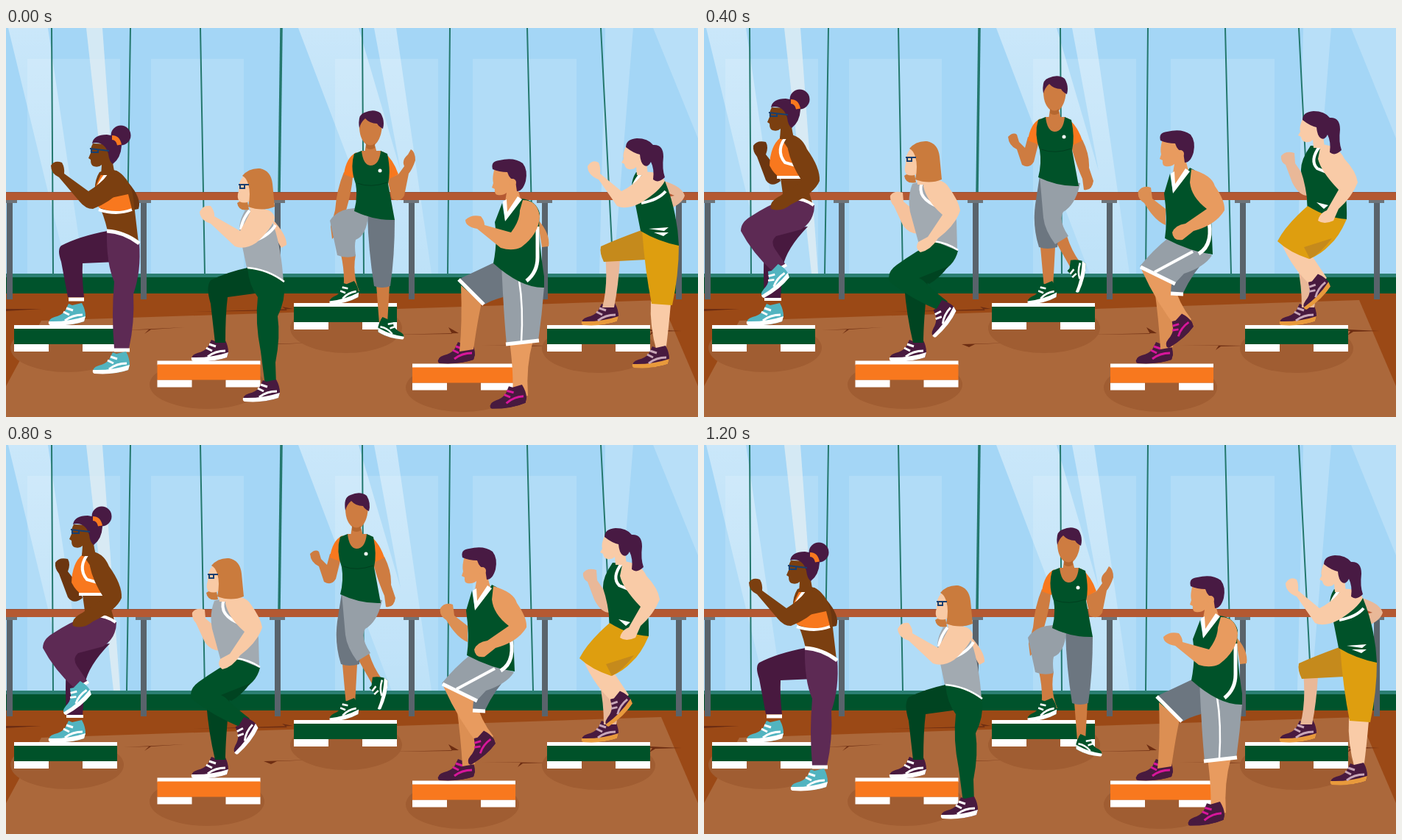
Write an HTML page that moves like this. It is 940x529 px and loops after 1.4 s.

```html
<!DOCTYPE html>
<html lang="en">
<head>
<meta charset="utf-8">
<title>Step class</title>
<style>
html,body{margin:0;width:100%;height:100%;overflow:hidden;background:#a4d6f6}
svg{display:block;width:100%;height:100%}
.p0,.p1,.p2,.p3{visibility:hidden;animation:p0 1.4s step-end infinite}
.p1{animation-name:p1}.p2{animation-name:p2}.p3{animation-name:p3}
@keyframes p0{0%,85.7143%{visibility:visible}14.2857%{visibility:hidden}}
@keyframes p1{0%,28.5714%,85.7143%{visibility:hidden}14.2857%,71.4286%{visibility:visible}}
@keyframes p2{0%,42.8571%,71.4286%{visibility:hidden}28.5714%,57.1429%{visibility:visible}}
@keyframes p3{0%,57.1429%{visibility:hidden}42.8571%{visibility:visible}}
.g{fill:#005229}.gd{fill:#004421}.o{fill:#f8781e}.w{fill:#fff}
.h{fill:#481a43}.pl{fill:#5d2a54}.pd{fill:#48193f}
.t{fill:#a2aab1}.l{fill:#969fa7}.d{fill:#6c7680}
.y{fill:#de9e0f}.yd{fill:#c58a1c}.b{fill:#ca7b3d}
.s{fill:var(--skin)}.s2{fill:var(--shade)}
.k,.thick,.thin{fill:none;stroke:#fff;stroke-width:4}
.thick{stroke-width:5}.thin{stroke-width:2.5}
.e{fill:none;stroke:#173f70;stroke-width:2}
#c1{--skin:#7b3f10;--shade:#6c3610;--shoe:#52b4c0;--sole:#fff;--lace:#fff}
#c2{--skin:#f9caa5;--shade:#f6c29c;--shoe:#481a3f;--sole:#fff;--lace:#fff}
#c3{--skin:#ce7c41;--shade:#b5672f;--shoe:#005229;--sole:#fff;--lace:#fff}
#c4{--skin:#e89b5f;--shade:#dc8f53;--shoe:#481a3f;--sole:#481a3f;--lace:#d8169b}
#c5{--skin:#f9cba7;--shade:#e9b898;--shoe:#481a3f;--sole:#e89a3c;--lace:#c8a6b8}
</style>
</head>
<body>
<svg viewBox="0 0 940 529">
<defs>
<linearGradient id="beam" x2="0" y2="1">
  <stop stop-color="#fff" stop-opacity=".42"/><stop offset="1" stop-color="#fff" stop-opacity=".16"/>
</linearGradient>
<g id="step">
  <path class="w" d="M0 0H140V6H0ZM0 26H47V36H0ZM93 26H140V36H93Z"/>
  <path fill="currentColor" d="M0 5H140V26H0Z"/>
</g>
<g id="post">
  <path fill="#59636b" d="M-4 236H4V369H-4Z"/>
  <path fill="#6d747a" d="M-11 233H10V238H-11Z"/>
</g>
<g id="shoe">
  <path fill="var(--shoe)" d="M1 0Q-2 -7 8 -10Q17 -12 22 -18L27 -28L32 -26L45 -29Q50 -20 50 -11L48 -4Q28 3 1 0Z"/>
  <path fill="var(--sole)" d="M0 -4Q26 -3 50 -11L48 -4Q28 3 2 1Q-1 0 0 -4Z"/>
  <path fill="none" stroke="var(--lace)" stroke-width="3" d="M20 -17L28 -13M24 -22L33 -19M22 -5Q32 -13 46 -13"/>
</g>
<g id="h1">
  <circle class="h" cx="156" cy="146" r="13.5"/>
  <path class="s" d="M118 157Q114 164 115 170L112 177L115 179Q115 187 119 188Q126 190 130 186L129 200L148 200L144 178L142 158Z"/>
  <path class="h" d="M117 157Q119 145 137 145Q155 147 157 160Q156 177 145 185Q140 181 139 171Q136 160 128 157Q122 155 117 157Z"/>
  <path fill="none" stroke="#f8781e" stroke-width="6" d="M144 149Q152 149 154 159"/>
  <path class="e" d="M114 164L140 167M116 165V169H125V166"/>
</g>
<g id="h2">
  <path class="b" d="M314 238Q322 232 328 236L330 247Q316 250 314 238Z"/>
  <path class="s" d="M322 202Q315 210 316 222Q313 230 317 236Q324 239 330 236L332 250H348L344 205Z"/>
  <path class="b" d="M321 201Q330 190 345 191Q360 194 362 212L365 243Q348 250 329 243Q333 225 329 212Q326 203 321 201Z"/>
  <path class="e" d="M316 213H330M318 214V218H324V214"/>
</g>
<g id="h3">
  <path class="s" d="M480 128Q479 150 489 158L486 178Q495 190 506 178L501 159Q511 150 511 128Q508 114 495 114Q482 116 480 128Z"/>
  <path class="s2" d="M489 157Q495 162 501 157V163Q495 167 489 163Z"/>
  <path class="h" d="M480 136Q477 118 487 115Q500 109 509 116Q515 126 512 137Q506 134 504 130Q494 130 488 123Q482 128 480 136Z"/>
</g>
<g id="top3">
  <path class="o" d="M476 169Q462 176 459 199L472 204L478 188ZM512 168Q526 178 533 199L517 207Z"/>
  <path class="s" d="M482 167H510V190H482Z"/>
  <path class="g" d="M473 171L483 167Q485 186 495 187Q507 187 509 167L518 171Q523 195 519 212L528 261Q500 262 473 249Q478 230 475 212Q467 190 473 171Z"/>
  <path fill="none" stroke="#003f1f" d="M477 211Q495 218 518 210"/>
  <circle class="w" cx="508" cy="194" r="2.5"/>
</g>
<g id="h4">
  <path class="s" d="M664 190Q660 203 662 211L660 217L664 219Q663 226 668 227Q675 228 680 224L677 242L680 258L700 236L695 218Q703 210 700 192Z"/>
  <path class="h" d="M661 192Q658 181 670 180Q690 175 702 184Q709 193 706 208Q702 222 694 222L692 208Q684 206 681 196Q670 196 661 192Z"/>
  <circle class="s" cx="688" cy="210" r="5"/>
</g>
<path id="collar" class="w" d="M675 236L678 263L701 233L695 229L681 250L680 233Z"/>
<g id="h5">
  <path class="s" d="M842 161Q837 172 839 178L836 183L840 185Q841 191 846 192Q852 193 856 189L857 200H872L868 165Z"/>
  <path class="h" d="M842 162Q842 151 857 150Q872 150 879 159Q893 158 893 175Q891 192 895 203Q886 212 879 206Q881 192 876 182Q872 190 867 187Q862 184 861 172Q852 170 842 162Z"/>
</g>
</defs>

<path fill="#a4d6f6" d="M0 0H940V340H0Z"/>
<path fill="#fff" fill-opacity=".14" d="M29 42H155V334H29ZM197 42H323V334H197ZM447 42H587V334H447ZM634 42H775V334H634Z"/>
<path fill="url(#beam)" d="M3 0H57L106 334H84ZM397 0H479L577 334H524ZM500 0H530L578 334H562Z"/>
<path fill="#fff" fill-opacity=".22" d="M814 0H852L825 334H806ZM879 0H940V150Z"/>
<path fill="#e9f1f4" fill-opacity=".7" d="M109 0H131L155 334H146Z"/>
<path fill="none" stroke="#24786d" stroke-width="2" d="M62 0L64 334M169 0L164 334M264 0L270 334M484 0L486 334M603 0L600 334M708 0L716 334M808 0L825 334"/>
<path fill="none" stroke="#24786d" stroke-width="3.5" d="M374 0L371 225"/>
<path fill="#2b7f72" d="M0 334H940V340H0Z"/>
<path fill="#00532c" d="M0 339H940V362H0Z"/>
<path fill="#9b4916" d="M0 361H940V529H0Z"/>
<path fill="#ab683b" d="M48 398L890 370L940 487V529H0V487Z"/>
<path fill="#6d2d12" d="M0 382L48 382L0 385ZM160 411L243 407L197 410L188 416L194 410ZM250 386L390 382L375 379L382 384ZM350 430L420 428L368 430L360 434ZM520 417L615 415L601 407L606 416ZM645 431L735 432L702 433L695 438L699 432ZM830 408L918 412L882 413L874 418L878 412Z"/>
<g fill="#a05d32">
  <ellipse cx="83" cy="435" rx="77" ry="33"/><ellipse cx="273" cy="485" rx="78" ry="33"/>
  <ellipse cx="462" cy="408" rx="76" ry="34"/><ellipse cx="620" cy="489" rx="77" ry="33"/>
  <ellipse cx="805" cy="436" rx="77" ry="33"/>
</g>
<use href="#post" x="5"/><use href="#post" x="187"/><use href="#post" x="369"/>
<use href="#post" x="551"/><use href="#post" x="732"/><use href="#post" x="914"/>
<path fill="#b45932" d="M0 223H940V234H0Z"/>
<path fill="#985238" d="M0 223H940V224H0Z"/>
<g color="#005229"><use href="#step" x="11" y="404"/><use href="#step" x="391" y="374"/><use href="#step" x="735" y="404"/></g>
<g color="#f8781e"><use href="#step" x="205.500" y="452.500"/><use href="#step" x="552" y="456.500"/></g>

<g id="c1">
<use href="#shoe" x="58" y="403"/>
<g class="p0">
  <path class="s2" d="M166 210Q185 232 180 246L170 248Z"/>
  <path class="s" d="M127 196Q140 190 150 194Q172 206 174 240L180 292L138 276Q132 250 122 232Q118 210 127 196Z"/>
  <path class="o" d="M131 195L120 219L126 244Q150 254 171 246L166 226L138 232Z"/>
  <path class="k" d="M140 194Q131 204 126 214M126 247Q150 255 171 247"/>
  <path class="pd" d="M138 276Q100 283 75 296Q69 301 75 318L84 366H106Q103 340 104 320L150 318Z"/>
  <path class="pl" d="M137 276Q160 278 181 292Q184 330 173 362Q175 400 167 436H147Q143 390 147 345Q136 320 137 276Z"/>
  <path class="thick" d="M137 276Q160 277 181 293M85 369H106M147 438H168"/>
  <path class="s" d="M150 194Q166 202 160 218Q140 238 118 246Q108 246 100 236L72 203Q61 198 61 187Q66 179 76 183Q80 190 79 198L112 222Q128 212 138 200Z"/>
  <use href="#h1"/><use href="#shoe" x="118" y="469"/>
</g>
<g class="p1">
  <path class="s2" d="M91 186Q96 181 102 184L120 200L115 221L108 218L92 198Q89 190 91 186Z"/>
  <path class="s" d="M118 162L136 158Q155 175 154 200L166 250L116 243L116 220Q104 200 110 185Z"/>
  <path class="o" d="M122 165Q108 180 106 199Q110 215 117 220H160V206L127 178Z"/>
  <path class="k" d="M128 163Q114 184 127 198M116 218H160"/>
  <path class="pd" d="M116 243Q95 270 78 295Q74 310 78 335L83 362H106Q104 335 110 308L140 270Z"/>
  <path class="pl" d="M122 243L168 257Q172 270 160 290Q147 310 148 330Q156 352 169 376L152 388Q128 350 114 328Q110 300 122 243Z"/>
  <path class="k" d="M124 243Q150 244 168 257M84 367H107M151 387L169 376"/>
  <path class="s" d="M130 161Q152 164 154 185Q163 215 160 238Q150 243 115 239L85 242Q72 240 71 231Q75 224 88 226L131 222Q125 200 123 180Z"/>
  <use href="#h1" x="-11" y="-33"/><use href="#shoe" transform="translate(142 425)rotate(-32)"/>
</g>
<g class="p2">
  <path class="s2" d="M67 160Q72 152 84 155Q88 162 84 172L98 190L104 208Q92 218 84 207L72 175Q66 168 67 160Z"/>
  <path class="s" d="M104 146L120 143L136 200L148 241L108 233L104 204L94 190Z"/>
  <path class="o" d="M104 149Q90 160 89 187Q95 199 104 204H135L124 178Z"/>
  <path class="k" d="M113 146Q96 166 110 183L128 188M99 203H135"/>
  <path class="pd" d="M141 270Q112 300 107 325L104 368H82Q80 330 82 300L95 275Z"/>
  <path class="pl" d="M110 232Q128 230 150 241Q150 262 132 274L98 283Q90 290 96 300L111 322L94 332Q65 305 50 276Q50 264 64 256Q85 242 110 232Z"/>
  <path class="k" d="M118 232Q135 231 149 241M93 333L112 322M82 369H105"/>
  <path class="s" d="M112 144Q132 145 140 165Q158 190 157 208Q150 225 118 240Q105 251 91 246Q88 236 104 228L133 208Q118 185 114 165Z"/>
  <use href="#h1" x="-26" y="-49"/><use href="#shoe" transform="translate(80 367)rotate(-33)scale(.94)"/>
</g>
<g class="p3">
  <path class="s2" d="M35 142Q38 135 50 136Q52 145 48 155L49 178L72 166V188Q50 200 33 196Q25 190 30 175L37 155Q34 148 35 142Z"/>
  <path class="s" d="M76 144L95 142L125 198L132 234L90 227L84 196L68 180Z"/>
  <path class="o" d="M77 148Q66 160 65 183Q75 194 86 198H125L121 182Z"/>
  <path class="k" d="M84 142Q76 180 121 186M82 197Q105 203 126 199"/>
  <path class="pd" d="M62 278L130 262Q118 280 108 300Q100 335 102 370H83Q75 340 61 315Q54 300 62 278Z"/>
  <path class="pl" d="M92 226L134 234Q137 250 120 264L98 273Q85 278 90 285L97 292L86 300Q50 272 32 250Q28 237 45 231Q70 227 92 226Z"/>
  <path class="k" d="M90 225Q115 226 134 236M81 299L97 286M83 374H103"/>
  <path class="s" d="M84 141Q105 145 120 160Q140 170 147 182Q146 205 130 230L122 246Q108 250 103 240Q104 230 116 222L125 195Q100 185 88 172Z"/>
  <use href="#h1" x="-57" y="-52"/><use href="#shoe" transform="translate(78 338)rotate(-43)scale(.95)"/>
</g>
</g>

<g id="c2">
<use href="#shoe" x="252" y="452"/>
<g class="p0">
  <path class="s2" d="M362 260Q382 282 381 295L374 299L366 285Z"/>
  <path class="t" d="M325 248Q316 262 317 278L327 326Q350 326 377 346Q374 300 364 270L352 246Z"/>
  <path class="k" d="M331 248Q321 260 319 274M336 290Q358 282 366 268"/>
  <path class="gd" d="M328 326Q300 332 278 343Q271 352 278 375L284 428H298Q298 390 301 366L345 360Z"/>
  <path class="g" d="M328 326Q355 328 378 347Q380 370 369 392Q373 420 366 455L367 486H352L346 440Q338 400 342 366Q330 350 328 326Z"/>
  <path class="thin" d="M328 326Q355 328 378 345"/>
  <path class="s" d="M338 246Q362 244 365 258Q362 272 340 292Q325 302 311 297L278 266Q264 262 263 250Q268 240 278 242Q284 250 283 256L318 276Q326 262 332 250Z"/>
  <use href="#h2"/><use href="#shoe" x="322" y="507"/>
</g>
<g class="p1">
  <path class="s2" d="M283 251Q292 247 299 255L314 272L305 280L290 266Q281 262 283 251Z"/>
  <path class="t" d="M305 226Q298 245 304 265L315 303Q340 300 366 318L362 280Q350 240 330 220Z"/>
  <path class="gd" d="M316 304Q295 325 277 343Q272 355 278 380L283 428H297Q298 395 304 372L325 340Z"/>
  <path class="g" d="M320 304Q345 304 366 318Q368 335 355 358Q346 375 350 390Q358 420 367 442L351 449Q335 410 316 383Q311 365 318 340Z"/>
  <path class="k" d="M314 226Q310 248 326 260"/><path class="thin" d="M316 304Q345 302 366 318"/>
  <path class="s" d="M318 222Q340 218 347 232Q352 265 349 282Q335 293 300 296Q285 302 270 297Q268 288 280 284L328 272Q314 250 315 235Z"/>
  <use href="#h2" x="-20" y="-21"/><use href="#shoe" transform="translate(333 474)rotate(-22)"/>
</g>
<g class="p2">
  <path class="s2" d="M253 228Q258 220 270 224L271 236L283 246L292 280Q278 280 270 268L258 242Q252 236 253 228Z"/>
  <path class="t" d="M283 212Q276 230 280 250L292 294L344 302L343 262Q330 225 305 206Z"/>
  <path class="gd" d="M272 350L304 342Q298 400 298 428H284Q275 390 272 350Z"/>
  <path class="g" d="M314 290L345 303Q340 325 315 335L295 340Q305 352 331 372L319 384Q280 368 252 345Q248 332 262 322Q290 302 314 290Z"/>
  <path class="gd" d="M292 340L332 324Q320 340 306 348Z"/>
  <path class="k" d="M296 210Q288 232 320 244"/><path class="thin" d="M312 290Q330 292 345 302"/>
  <path class="s" d="M300 206Q325 204 332 216Q346 235 348 248Q342 268 318 286Q308 302 294 305Q286 300 291 291L304 284L324 254Q302 235 298 215Z"/>
  <use href="#h2" x="-42" y="-37"/><use href="#shoe" transform="translate(313 421)rotate(-46)scale(.97)"/>
</g>
<g class="p3">
  <path class="s2" d="M229 190Q235 182 245 186L243 203L237 222L262 210L264 232Q240 248 224 245Q218 238 224 225L232 203Q228 198 229 190Z"/>
  <path class="t" d="M266 198Q258 220 262 240L272 274L326 280L324 235Q305 215 290 196Z"/>
  <path class="gd" d="M256 328L328 300Q312 330 300 342Q290 360 287 390L298 428H286Q265 390 254 360Q250 345 256 328Z"/>
  <path class="g" d="M272 275L327 281Q332 295 318 310L302 318Q282 318 277 325L297 340L285 352Q250 330 228 306Q224 294 236 286Q255 276 272 275Z"/>
  <path class="k" d="M278 198Q272 228 304 232"/><path class="thin" d="M272 274Q300 272 327 281"/>
  <path class="s" d="M280 196Q310 192 320 208Q336 222 341 235Q338 255 322 275L315 293Q303 298 299 289Q301 278 311 270L317 240Q290 232 281 220Z"/>
  <use href="#h2" x="-60" y="-50"/><use href="#shoe" transform="translate(273 388)rotate(-44)scale(.96)"/>
</g>
</g>

<g id="c3">
<g class="p0">
  <path class="s" d="M459 196L471 202Q470 220 462 248L454 275L443 287L441 270L447 248Q449 220 459 196ZM518 205L533 199L541 188Q537 180 546 172L550 165Q556 168 556 180Q552 192 547 198L541 228Q535 238 524 232ZM455 308H475Q470 335 480 358L458 358Q461 335 455 308ZM503 350H521L518 402H507Z"/>
  <path class="d" d="M491 253L528 261Q528 310 522 351Q511 355 500 351Q492 300 491 253Z"/>
  <path class="l" d="M474 245Q450 246 440 262Q445 285 450 309Q463 314 475 310Q473 295 475 288Q490 282 492 254Z"/>
  <use href="#top3"/><use href="#h3"/>
  <use href="#shoe" transform="translate(440 375)rotate(-8)scale(.82 .9)"/>
  <use href="#shoe" transform="translate(540 423)rotate(10)scale(-.74 .85)"/>
</g>
<g class="p1">
  <path class="s" d="M439 176L453 180Q449 205 448 222L447 236Q438 240 434 232L436 215Q436 195 439 176ZM499 183L514 176L524 180Q520 172 528 168Q535 175 533 186Q528 194 522 197L516 208Q508 214 502 209ZM453 308H475L474 354H460ZM481 316H499L503 358L488 360Z"/>
  <path class="d" d="M454 223L482 230L474 311H452Q444 290 443 270Q448 245 454 223Z"/>
  <path class="l" d="M470 226L508 238Q506 270 500 319Q487 322 477 316Q468 290 470 226Z"/>
  <use href="#top3" x="-20" y="-22"/><use href="#h3" x="-19" y="-22"/>
  <use href="#shoe" transform="translate(440 375)rotate(-8)scale(.82 .9)"/>
  <use href="#shoe" transform="translate(482 391)rotate(-42)scale(.85)"/>
</g>
<g class="p2">
  <path class="s" d="M440 148L455 154L448 182Q442 192 432 186L425 165Q414 160 413 148Q420 141 425 145L428 155L436 163ZM498 158L514 152Q524 172 523 190L529 208Q527 222 516 220L514 205Q505 185 498 158ZM457 298H477L474 354H462ZM478 291L493 283Q500 305 512 320L499 328Z"/>
  <path class="d" d="M456 201L485 205L480 298Q466 302 455 298Q446 270 450 240Z"/>
  <path class="l" d="M456 201L511 211Q505 240 488 250Q481 262 495 283L477 294Q463 275 461 258Z"/>
  <use href="#top3" x="-19" y="-46"/><use href="#h3" x="-19" y="-47"/>
  <use href="#shoe" transform="translate(440 375)rotate(-8)scale(.82 .9)"/>
  <use href="#shoe" transform="translate(508 360)rotate(-70)scale(.85)"/>
</g>
<g class="p3">
  <path class="s" d="M490 140L505 134Q520 160 530 190L541 212Q541 222 532 219L520 203Q504 175 490 140ZM462 240H480L476 342H460ZM447 238H465L463 280H448Z"/>
  <use href="#top3" x="-28" y="-65"/><use href="#h3" x="-28" y="-65"/>
  <path class="s" d="M434 108L446 110L443 150Q434 156 427 150V122L434 100Q425 92 426 78Q432 68 438 70L439 90L442 104Z"/>
  <path class="d" d="M462 190L496 191Q492 212 483 220L480 291H465Z"/>
  <path class="l" d="M445 177Q434 181 431 196L437 242Q452 246 466 241Q464 225 466 213L496 192Q470 180 445 177Z"/>
  <use href="#shoe" transform="translate(443 373)rotate(-22)scale(.78 .9)"/>
  <use href="#shoe" transform="translate(450 321)rotate(-60)scale(.9)"/>
</g>
</g>

<g id="c4">
<use href="#shoe" x="587" y="455"/>
<g class="p0">
  <path class="s2" d="M722 260Q740 280 737 297L728 298ZM618 350L646 374Q641 395 635 437L616 440Q620 400 618 350Z"/>
  <path class="s" d="M684 426L716 425Q706 460 709 500L688 502Q690 470 684 426Z"/>
  <path class="d" d="M665 318Q640 330 616 341L650 376Q660 370 675 366L690 325Z"/>
  <path class="l" d="M673 320Q705 345 731 352Q728 390 723 426L680 430Q676 390 673 320Z"/>
  <path class="thick" d="M615 342L649 376M679 430L724 425"/><path class="thin" d="M697 343Q703 380 700 427"/>
  <use href="#h4"/>
  <path class="g" d="M674 238L678 262L700 232Q720 234 725 252Q722 280 731 338V353Q700 354 662 320Q668 290 664 264Z"/>
  <use href="#collar"/><path class="thick" d="M722 270V312Q722 332 707 344"/>
  <path class="s" d="M702 234Q722 234 725 256Q724 280 700 298Q688 304 672 299L640 273Q624 270 624 261Q632 253 645 256Q650 262 650 268L686 278Q698 262 698 248Z"/>
  <use href="#shoe" transform="translate(658 517)rotate(-4)"/>
</g>
<g class="p1">
  <path class="s2" d="M627 254Q632 246 644 249L651 262L650 278L640 276Q627 266 627 254ZM613 356L643 365Q634 400 636 437L617 439Q619 395 613 356Z"/>
  <path class="s" d="M660 391L694 391Q700 425 717 448L700 458Q680 425 660 391Z"/>
  <path class="d" d="M648 298Q625 325 607 353L652 366Q660 350 668 340L685 315Z"/>
  <path class="l" d="M658 300L716 332Q708 360 697 393L652 390Q656 350 658 300Z"/>
  <path class="thick" d="M606 353L652 366M651 390L698 394"/><path class="k" d="M685 320Q681 350 673 391"/>
  <use href="#h4" x="-16" y="-22"/>
  <path class="g" d="M658 216L662 240L684 208Q705 210 709 230Q707 255 716 300V334Q685 328 648 300Q652 270 648 240Z"/>
  <use href="#collar" x="-16" y="-22"/><path class="thick" d="M706 286Q709 310 694 325"/>
  <path class="s" d="M688 211Q708 212 709 235V278Q700 287 675 288L648 294Q632 295 630 285Q632 276 645 277L687 266Q682 245 683 230Z"/>
  <use href="#shoe" transform="translate(684 486)rotate(-36)"/>
</g>
<g class="p2">
  <path class="s2" d="M590 222Q596 213 607 217L609 232L627 246V268Q612 262 598 238Q588 232 590 222ZM612 355L640 370Q638 400 637 434L620 437Q618 400 612 355Z"/>
  <path class="s" d="M594 328L638 347Q645 375 662 396L645 412Q615 375 594 328Z"/>
  <path class="d" d="M636 335L688 308Q665 330 650 362L634 360Z"/>
  <path class="l" d="M630 286L690 309Q680 325 652 334L640 347L592 324Q610 302 630 286Z"/>
  <path class="thick" d="M593 325L640 348M634 361L651 362"/><path class="k" d="M612 332L664 304"/>
  <use href="#h4" x="-41" y="-39"/>
  <path class="g" d="M633 198L637 224L660 190Q684 200 688 238L691 308Q660 304 626 286Q630 260 625 225Z"/>
  <use href="#collar" x="-41" y="-38"/><path class="thick" d="M684 255Q694 294 672 307"/>
  <path class="s" d="M662 192Q690 200 694 215Q708 235 707 248Q695 268 665 276L650 288Q637 290 636 278Q640 268 654 266L683 246Q662 230 660 210Z"/>
  <use href="#shoe" transform="translate(630 435)rotate(-35)scale(.94)"/>
</g>
<g class="p3">
  <path class="s2" d="M556 195Q560 184 573 186L576 202L583 217L602 205V235Q590 248 578 245L562 210Q555 204 556 195ZM598 338L628 366Q632 400 633 437H614Q610 400 593 365Q590 350 598 338Z"/>
  <path class="d" d="M610 314L672 298Q652 328 637 350L624 345Z"/>
  <path class="s" d="M580 288L614 318Q630 338 637 357L618 368Q580 338 567 307Q563 291 580 288Z"/>
  <path class="l" d="M604 273Q650 268 673 297L668 304Q645 318 613 319Q594 308 579 289Q590 277 604 273Z"/>
  <path class="thick" d="M580 287Q592 310 614 320M623 346L637 350"/><path class="k" d="M590 295L644 283"/>
  <use href="#h4" x="-68" y="-47"/>
  <path class="g" d="M605 190L611 216L633 180Q657 190 662 235L673 301Q640 270 602 276Q606 250 601 215Z"/>
  <use href="#collar" x="-67" y="-47"/><path class="k" d="M647 222Q657 240 664 270"/>
  <path class="s" d="M638 183Q665 182 680 195Q705 208 707 224Q700 248 682 268Q674 288 662 290Q653 282 658 272L672 258L680 232Q650 225 638 213Z"/>
  <use href="#shoe" transform="translate(606 399)rotate(-42)scale(.93)"/>
</g>
</g>

<g id="c5">
<use href="#shoe" x="782" y="403"/>
<g class="p0">
  <path class="s2" d="M893 208Q918 215 922 228Q918 240 900 246L897 230L908 228L894 222ZM814 310L834 314Q832 350 826 380H810Q818 350 814 310Z"/>
  <path class="s" d="M876 372L903 375Q900 410 896 440H884Q874 405 876 372Z"/>
  <path class="yd" d="M863 275Q830 287 808 297Q806 306 812 318L870 315L880 280Z"/>
  <path class="y" d="M864 275L914 295Q914 335 905 377L877 375Q868 330 864 275Z"/>
  <path class="g" d="M856 196Q847 210 852 225L862 276Q885 290 914 296Q912 250 895 208Z"/>
  <path class="w" d="M873 273L900 271L894 276ZM880 278L900 278L893 283Z"/><path class="k" d="M864 197Q856 205 852 215M863 238Q886 234 896 222"/>
  <path class="s" d="M868 196Q888 194 895 208Q888 222 862 238Q842 248 830 242L805 206Q790 200 790 188Q796 178 805 183Q808 190 807 198L836 222Q852 214 862 202Z"/>
  <use href="#h5"/><use href="#shoe" x="851" y="461"/>
</g>
<g class="p1">
  <path class="s2" d="M829 214Q836 206 843 212L846 228H832ZM808 306L834 312Q828 345 828 380H811Q816 345 808 306Z"/>
  <path class="s" d="M853 337L880 340Q890 375 907 400L890 410Q872 375 853 337Z"/>
  <path class="yd" d="M850 249Q828 275 807 303Q815 312 832 316L853 296L870 265Z"/>
  <path class="y" d="M850 249L903 269Q895 305 880 343L851 339Q856 300 850 249Z"/>
  <path class="g" d="M846 172Q832 195 836 218L850 250Q875 267 903 271L900 240Q890 205 880 170Z"/>
  <path class="w" d="M862 247L888 245L882 250ZM870 252L892 255L884 259Z"/><path class="k" d="M856 170Q847 185 852 202M878 208L885 203"/>
  <path class="s" d="M858 170Q880 168 882 185Q880 215 872 236Q858 246 820 240Q800 244 793 234Q796 224 810 226L852 226Q858 210 853 185Z"/>
  <use href="#h5" x="-11" y="-25"/><use href="#shoe" transform="translate(870 438)rotate(-35)"/>
</g>
<g class="p2">
  <path class="s2" d="M784 174Q790 166 802 170L803 184L814 200L823 215L820 228Q808 228 799 210L790 186Q783 182 784 174ZM806 322L834 348L829 380H812Q812 350 806 322Z"/>
  <path class="s" d="M784 292L826 310Q836 325 846 340L829 354Q800 330 784 292Z"/>
  <path class="y" d="M820 242L873 260Q862 285 850 295Q838 308 822 314Q795 305 779 290Q790 268 820 242Z"/>
  <path class="yd" d="M815 298L853 286Q838 306 823 314Z"/>
  <path class="g" d="M824 160Q810 180 811 195Q818 215 820 242Q845 258 873 260Q874 230 868 205L852 162Z"/>
  <path class="w" d="M832 237L848 241L842 246Z"/><path class="k" d="M837 160Q822 180 833 191L865 204"/>
  <path class="s" d="M838 158Q862 160 870 178Q886 195 888 210Q880 230 862 246L855 262Q842 268 834 262Q836 252 846 248L862 220Q838 195 834 178Z"/>
  <use href="#h5" x="-29" y="-37"/><use href="#shoe" transform="translate(817 383)rotate(-38)scale(.96)"/>
</g>
<g class="p3">
  <path class="s2" d="M757 144Q762 135 774 139L773 153L767 172L788 164L793 185Q772 200 755 196Q748 190 752 178L760 155ZM788 325L807 337L828 380H812Q800 355 788 325Z"/>
  <path class="yd" d="M782 268L835 268Q815 300 804 329L786 330Q776 300 782 268Z"/>
  <path class="s" d="M755 266Q775 246 790 254Q804 275 823 302L808 318Q770 290 755 266Z"/>
  <path class="y" d="M806 228Q775 230 752 239Q743 250 757 270Q772 254 787 254L796 264Q830 278 858 257L857 240Z"/>
  <path class="g" d="M797 145Q786 160 787 180L806 224Q830 243 857 243Q856 215 845 185L820 145Z"/>
  <path class="w" d="M818 220L842 221L834 225ZM824 226L840 227L832 231Z"/><path class="k" d="M809 144Q796 180 844 184"/>
  <path class="s" d="M812 143Q835 142 845 158Q866 168 870 183Q866 205 850 228L844 245Q832 250 826 238Q830 226 840 222L850 192Q815 184 806 172Z"/>
  <use href="#h5" x="-57" y="-53"/><use href="#shoe" transform="translate(798 346)rotate(-43)scale(.95)"/>
</g>
</g>
</svg>
</body>
</html>
```
